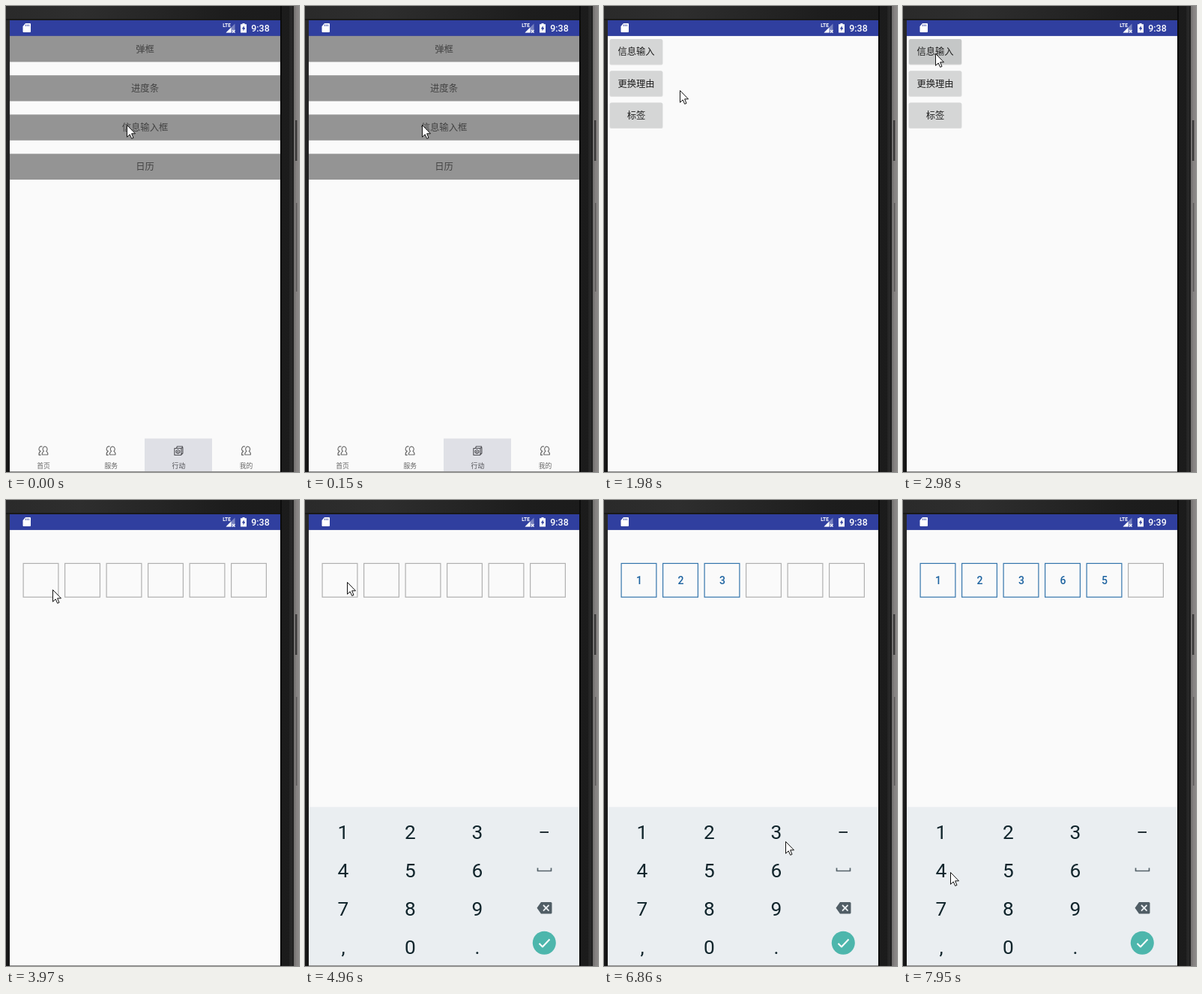
An HTML page with a canvas for the animation above (8000 ms loop, 391 by 620 pixels).

```html
<!DOCTYPE html>
<html lang="zh-CN">
<head>
<meta charset="utf-8">
<style>
html, body { margin: 0; width: 100%; height: 100%; overflow: hidden; background: #1b1b1b; }
canvas { display: block; }
</style>
</head>
<body>
<canvas id="stage" width="391" height="620"></canvas>
<script>
const ctx = document.getElementById('stage').getContext('2d');
const LOOP = 8000;
const FONT = 'Roboto, "Noto Sans CJK SC", "Noto Sans CJK", sans-serif';
const BLUE = '#303f9f';
const KEYS = '#eaeef1';
const MENU_AT = 1460, INPUT_AT = 3130, KEYBOARD_AT = 4680;

const POINTER = [
  { start: 0, end: 0, x: 161, y: 158 },
  { start: 150, end: 150, x: 156, y: 158 },
  { start: 1580, end: 2400, x: 43, y: 63 },
  { start: 3400, end: 3970, x: 62, y: 119 },
  { start: 4530, end: 4680, x: 56, y: 109 },
  { start: 5200, end: 5780, x: 56, y: 442 },
  { start: 5910, end: 6290, x: 156, y: 456 },
  { start: 6430, end: 6720, x: 242, y: 454 },
  { start: 7000, end: 7300, x: 237, y: 496 },
  { start: 7440, end: 7690, x: 150, y: 499 },
  { start: 7820, end: 7950, x: 63, y: 495 }
];
const TYPED = [
  { digit: '1', at: 5910 }, { digit: '2', at: 6430 }, { digit: '3', at: 6860 },
  { digit: '6', at: 7440 }, { digit: '5', at: 7820 }
];

const tabX = i => 50 + i * 90.2;
const keyX = i => 51 + i * 89.5;

function rect(x, y, w, h, color) {
  ctx.fillStyle = color;
  ctx.fillRect(x, y, w, h);
}

function roundRect(x, y, w, h, r, color) {
  ctx.fillStyle = color;
  ctx.beginPath();
  ctx.roundRect(x, y, w, h, r);
  ctx.fill();
}

function text(str, x, y, size, color, weight = 400) {
  ctx.font = `${weight} ${size}px ${FONT}`;
  ctx.textAlign = 'center';
  ctx.fillStyle = color;
  ctx.fillText(str, x, y);
}

function shape(d, x, y, fill, stroke, width = 1) {
  const path = new Path2D(d);
  ctx.save();
  ctx.translate(x, y);
  ctx.lineJoin = 'round';
  if (fill) { ctx.fillStyle = fill; ctx.fill(path); }
  if (stroke) { ctx.strokeStyle = stroke; ctx.lineWidth = width; ctx.stroke(path); }
  ctx.restore();
}

function gradient(x0, y0, x1, y1, ...colors) {
  const g = ctx.createLinearGradient(x0, y0, x1, y1);
  colors.forEach((color, i) => g.addColorStop(i / (colors.length - 1), color));
  return g;
}

function drawPhone() {
  rect(0, 0, 391, 620, gradient(0, 0, 391, 0, '#2a2a2a', '#2e2e2e', '#262626', '#1d1d1d', '#1b1b1b'));
  rect(0, 17, 366, 2, '#191919');
  rect(0, 19, 5, 601, gradient(0, 19, 0, 620, '#292929', '#1d1d1d', '#151515'));
  rect(366, 0, 2, 620, '#0c0c0c');
  rect(378, 0, 6, 620, gradient(378, 0, 384, 0, '#222', '#2a2a2a', '#191919'));
  rect(384, 0, 7, 620, gradient(384, 0, 391, 0, '#6e6c6b', '#858281', '#8b8887'));
  rect(386, 152, 2.4, 54, '#3a3939');
  rect(387, 262, 1.4, 118, '#5a5857');
}

function drawStatusIcons(t) {
  shape('M3.5 0H9.5Q10.5 0 10.5 1V11Q10.5 12 9.5 12H1Q0 12 0 11V4Z', 22.5, 23, '#fff');
  shape('M4 1.5V4M6 1.5V4M8 1.5V4', 22.5, 23, null, BLUE, .8);
  text('LTE', 294.5, 28, 6.6, '#fff', 700);
  shape('M12 0V12H0Z', 293.5, 23.5, 'rgba(255,255,255,.35)');
  shape('M7 5V12H0Z', 293.5, 23.5, '#fff');
  shape('M8.5 8L12 11.6M12 8L8.5 11.6', 293.5, 24, null, '#fff', 1.2);
  shape('M2.5 0H5.5V1.4H8V12.5H0V1.4H2.5Z', 313, 22.9, '#fff');
  shape('M4.7 3.3L1.8 7.7H3.6V10.7L6.3 6.2H4.7Z', 313, 22.9, BLUE);
  text(t < 7000 ? '9:38' : '9:39', 339.5, 34, 12.4, '#fff', 500);
}

function drawPage() {
  rect(5, 39.6, 361, 580.4, '#fafafa');
  rect(5, 19, 361, 20.8, BLUE);
  drawBottomEdge();
}

function drawBottomEdge() {
  rect(5, 619, 361, 1, '#8e8e8e');
}

function drawPeopleIcon(x, color) {
  shape('M2-6A3.6 3.6 0 0 1 3.7 .4Q6.3 2 5.8 5H-1.8Q-2.2 2 .5 .4A3.6 3.6 0 0 1 2-6Z', x, 592, null, color, 1.1);
  shape('M-1.6-5.8A3.2 3.2 0 0 0-3.8 .3Q-6.4 2-6 5.4H-3.4', x, 592, null, color, 1.1);
}

function drawBagIcon(x, color) {
  shape('M-3-3.5L-2-6H5L5.5-4V3L3 5.5H-5.5V-3.5H3.5V5M3.5-3.5L5.5-5', x, 592, null, color, 1.1);
  shape('M-1-1.5A2.4 2.4 0 1 0-.9-1.5M-1 0V2', x, 592, null, color, 1.2);
}

function drawHome() {
  drawPage();
  ['弹框', '进度条', '信息输入框', '日历'].forEach((label, i) => {
    const y = 40 + i * 52.2;
    rect(5, y, 361, 34.4, '#949494');
    text(label, 185.5, y + 21.8, 12.3, '#424242');
  });
  rect(185, 575.5, 90, 43.5, '#dfe0e6');
  ['首页', '服务', '行动', '我的'].forEach((label, i) => {
    const active = i === 2;
    const color = active ? '#4d4d52' : '#666';
    (active ? drawBagIcon : drawPeopleIcon)(tabX(i), color);
    text(label, tabX(i), 614.7, 8.8, color);
  });
}

function drawMenu(t) {
  drawPage();
  ['信息输入', '更换理由', '标签'].forEach((label, i) => {
    const y = 44 + i * 42.3;
    const pressed = i === 0 && t >= 2710;
    roundRect(7.5, y + .5, 71, 34, 2, 'rgba(0,0,0,.12)');
    roundRect(8, y, 70, 33.4, 2, pressed ? '#c5c7c7' : '#d5d6d6');
    text(label, 43, y + 21.2, 12.3, '#1e1e1e');
  });
}

function drawInput(t) {
  drawPage();
  for (let i = 0; i < 6; i++) {
    const x = 22.5 + i * 55.5;
    const filled = i < TYPED.length && t >= TYPED[i].at;
    ctx.strokeStyle = filled ? '#3475ac' : '#b0b0b0';
    ctx.lineWidth = 1.2;
    ctx.strokeRect(x + .6, 84.4, 46.8, 44.8);
    if (filled) text(TYPED[i].digit, x + 24.4, 112, 14, '#1d63a0', 500);
  }
}

function drawKeyboard() {
  rect(5, 408.5, 361, 211.5, KEYS);
  ['123', '456', '789', ',0.'].forEach((row, r) => {
    [...row].forEach((key, c) => text(key, keyX(c), 451.4 + r * 51, 26.3, '#11252c'));
  });
  const x = keyX(3);
  rect(x - 6, 441, 11.5, 2, '#263238');
  shape('M-9-3V1H9V-3', x, 492.5, null, '#55626a', 1.7);
  shape('M-10 0L-4.5-7.8H8.5Q10-7.8 10-6.2V6.2Q10 7.8 8.5 7.8H-4.5Z', x, 542.8, '#505d65');
  shape('M-1.5-3.8L6 3.8M6-3.8L-1.5 3.8', x, 542.8, null, KEYS, 1.8);
  roundRect(x - 15.7, 573.8, 31, 31, 15.5, '#4db6ac');
  shape('M-7 .5L-2.5 5L7-5', x, 589.5, null, '#fff', 2);
  drawBottomEdge();
}

// Fades a layer in while it rises into place with a decelerating ease.
function arrive(t, start, draw, fade, drop) {
  const left = Math.max(0, 1 - (t - start) / 260) ** 2;
  ctx.save();
  ctx.globalAlpha = 1 - fade * left;
  ctx.translate(0, drop * left);
  draw(t);
  ctx.restore();
  return left;
}

function openPage(t, start, draw) {
  if (t - start < 260) rect(5, 19, 361, 601, 'rgba(0,0,0,.18)');
  arrive(t, start, draw, .05, 8.5);
}

function drawScreen(t) {
  ctx.save();
  ctx.beginPath();
  ctx.rect(5, 19, 361, 601);
  ctx.clip();
  if (t < INPUT_AT) drawHome(); else drawMenu(t);
  if (t >= INPUT_AT) openPage(t, INPUT_AT, drawInput);
  else if (t >= MENU_AT) openPage(t, MENU_AT, drawMenu);
  if (t >= KEYBOARD_AT) arrive(t, KEYBOARD_AT, drawKeyboard, .5, 40);
  drawStatusIcons(t);
  ctx.restore();
}

function drawPointer(t) {
  const i = POINTER.findLastIndex(move => move.start <= t);
  const to = POINTER[i], from = POINTER[i - 1] || to;
  const p = t >= to.end ? 1 : (t - to.start) / (to.end - to.start);
  const along = axis => Math.round(from[axis] + (to[axis] - from[axis]) * p);
  shape('M.5 .5V16.3L4.2 12.9L6.7 18.4L9 17.4L6.6 11.8H11.5Z', along('x'), along('y'), '#fff', '#111');
}

const start = performance.now();
function render() {
  const t = (performance.now() - start) % LOOP;
  drawPhone();
  drawScreen(t);
  drawPointer(t);
  requestAnimationFrame(render);
}
render();
</script>
</body>
</html>
```
